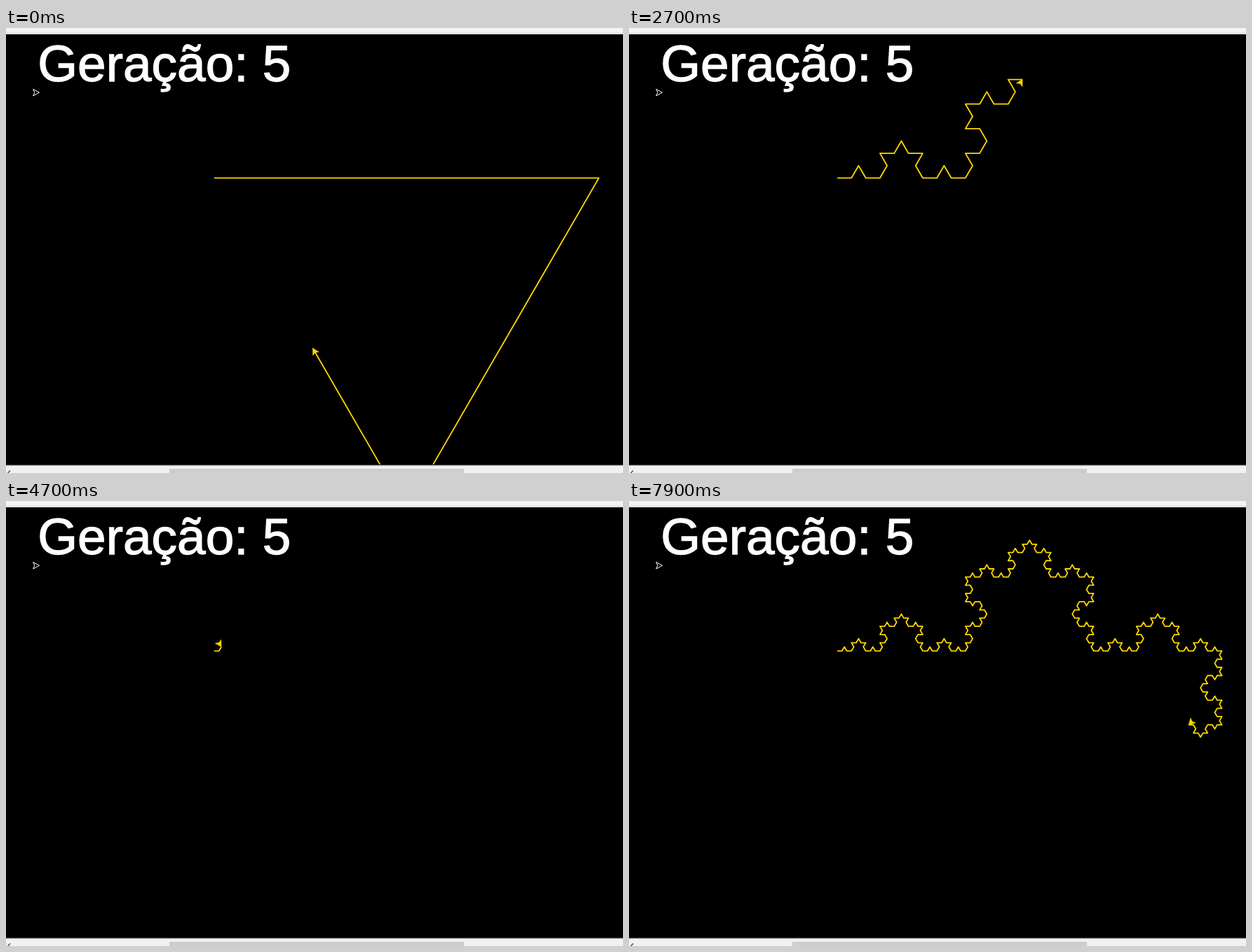
Recreate the animation shown at these times as an HTML page. Size 880 by 636 pixels, loop 8 s.

```html
<!DOCTYPE html>
<html lang="pt">
<head>
<meta charset="utf-8">
<title>Floco de Koch</title>
<style>
  html, body { margin: 0; width: 100%; height: 100%; overflow: hidden; background: #000; }
  svg { display: block; width: 880px; height: 636px; }
</style>
</head>
<body>
<svg viewBox="0 0 880 636">
  <defs><clipPath id="pane"><rect y="9" width="880" height="614.5"/></clipPath></defs>
  <rect width="880" height="636" fill="#000"/>
  <rect width="880" height="9" fill="#f3f3f3"/>
  <rect y="7" width="880" height="1" fill="#d4d4d4"/>
  <rect y="625" width="880" height="11" fill="#f1f1f1"/>
  <rect y="624.5" width="880" height="1" fill="#8a8a8a"/>
  <rect x="233" y="630" width="420" height="6" fill="#cdcdcd"/>
  <path d="M6 632.5L2.5 636" fill="none" stroke="#505050" stroke-width="1.6"/>
  <text x="45.3" y="76" fill="#fff" stroke="#fff" stroke-width="1.3" font-size="73" font-family="'Liberation Sans', Arial, sans-serif">Geração: 5</text>
  <path d="M47.5 92.2L38.7 87.4L40.8 92.2L38.7 97Z" fill="#000" stroke="#fff"/>
  <g clip-path="url(#pane)">
    <path id="trail" fill="none" stroke="#ffd700" stroke-width="1.8" stroke-linejoin="round"/>
    <path id="pen" fill="#ffd700" stroke="#ffd700" stroke-width="0.5"/>
  </g>
</svg>
<script>
const LOOP = 8000, TICK = 100, SIDE = 548.6, START = [297, 214.3];

// move: share of each step spent moving; the rest is the turn.
// keys: [time in ms, steps done]
const RUNS = [
  { order: 0, move: 0.97, keys: [[0, 2.473], [90, 3]] },
  { order: 1, move: 0.9, keys: [[90, 0], [865, 12]] },
  { order: 2, move: 0.75, keys: [[865, 0], [900, 1.12], [1100, 7.875], [1700, 30.5], [1800, 33.9], [2260, 48]] },
  { order: 3, move: 0.5, keys: [[2260, 0], [2700, 31], [3600, 97.75], [4000, 137.75], [4500, 173.5], [4600, 183.9], [4680, 192]] },
  { order: 4, move: 0.4, keys: [[4680, 0], [5400, 71.85], [6300, 154.4], [6600, 182.55], [7200, 236.7], [7900, 300.85], [8000, 310]] }
];

const rad = deg => deg * Math.PI / 180;
const ahead = ([x, y], deg, d) => [x + d * Math.cos(rad(deg)), y - d * Math.sin(rad(deg))];
const fmt = p => p.map(v => v.toFixed(2)).join(' ');

function koch(order, deg) {
  if (!order) return [deg];
  return [0, 60, -60, 0].flatMap(turn => koch(order - 1, deg + turn));
}

for (const run of RUNS) {
  run.step = SIDE / 3 ** run.order;
  run.heads = [0, -120, -240].flatMap(deg => koch(run.order, deg));
  run.points = [START];
  run.heads.forEach((deg, i) => run.points.push(ahead(run.points[i], deg, run.step)));
}

function progress(keys, t) {
  let i = 1;
  while (i < keys.length - 1 && t > keys[i][0]) i++;
  const [t0, a] = keys[i - 1], [t1, b] = keys[i];
  return t === t1 ? b : a + (b - a) * (t - t0) / (t1 - t0);
}

const trail = document.getElementById('trail');
const pen = document.getElementById('pen');

function draw(t) {
  const run = RUNS.find(r => t < r.keys[r.keys.length - 1][0]);
  const p = progress(run.keys, t);
  const i = Math.floor(p), part = p - i;
  const moved = Math.min(1, part / run.move);
  const turned = Math.max(0, (part - run.move) / (1 - run.move));
  const from = run.heads[i];
  const next = run.heads[(i + 1) % run.heads.length];
  const turn = ((next - from + 180) % 360 + 360) % 360 - 180;
  const deg = from + turn * turned;
  const tip = ahead(run.points[i], from, run.step * moved);

  trail.setAttribute('d', 'M' + [...run.points.slice(0, i + 1), tip].map(fmt).join('L'));
  const corner = (back, side) => ahead(ahead(tip, deg, -back), deg + 90, side);
  pen.setAttribute('d', 'M' + [tip, corner(9, 5), corner(7, 0), corner(9, -5)].map(fmt).join('L') + 'Z');
}

const began = performance.now();
function loop() {
  const t = (performance.now() - began) % LOOP;
  draw(Math.floor(t / TICK) * TICK);
  requestAnimationFrame(loop);
}
loop();
</script>
</body>
</html>
```
